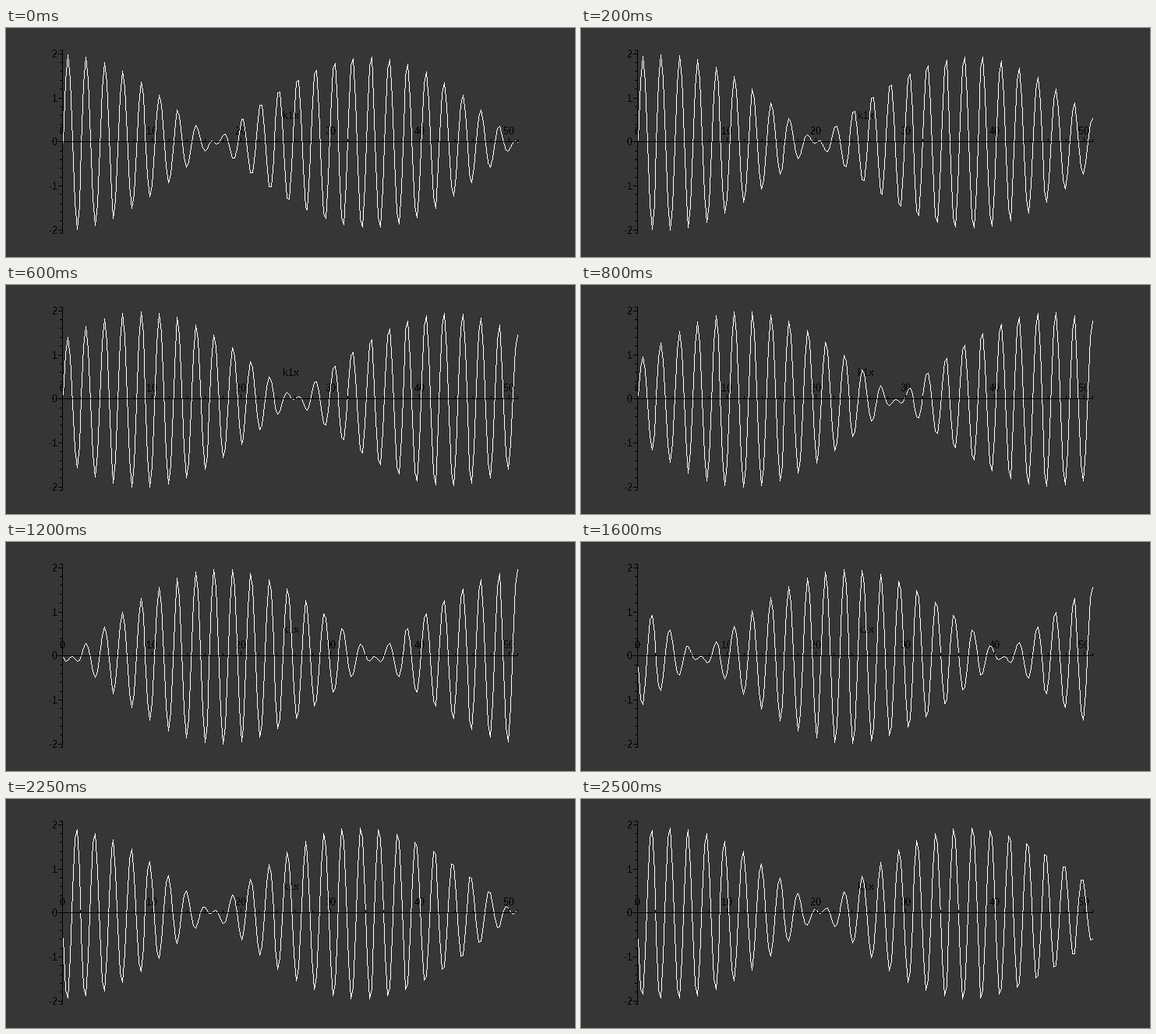
Animation of 730 by 295 pixels, one loop 2550 ms. Source, as a matplotlib script:

```python
import numpy as np
import matplotlib.pyplot as plt
from matplotlib.animation import FuncAnimation

W, H, DPI = 730, 295, 100
FRAMES, STEP_MS = 51, 50
PX = 72 / DPI                     # one pixel in points
AXIS_X, AXIS_Y = 72, 146          # pixel column and row of the axes
TOP, BOTTOM, RIGHT = 28, 264, 656
X_MAX = 51
Y_UNIT = 56.75

plt.rcParams["text.antialiased"] = False
plt.rcParams["text.hinting"] = "native"
plt.rcParams["text.hinting_factor"] = 1
plt.rcParams["font.family"] = "Liberation Sans"

fig = plt.figure(figsize=(W / DPI, H / DPI), dpi=DPI, facecolor="#363636")
ax = fig.add_axes([0, 0, 1, 1])


def stroke(x0, y0, x1, y1):
    """Black one-pixel line between two pixels, both included."""
    ax.plot([x0 + 0.5, x1 + 0.5], [y0 + 0.5, y1 + 0.5], color="black",
            lw=0.6 * PX, antialiased=False, snap=False, zorder=3,
            solid_capstyle="projecting")


def label(x, y, text, align):
    ax.text(x, y, text, color="black", fontsize=13 * PX, ha=align,
            va="baseline", zorder=1)


def draw_axes():
    stroke(AXIS_X, TOP, AXIS_X, BOTTOM)
    stroke(AXIS_X, AXIS_Y, RIGHT, AXIS_Y)

    for x in range(0, X_MAX, 2):
        col = round(AXIS_X + x * (RIGHT - AXIS_X) / X_MAX)
        size = 5 if x % 10 == 0 else 3
        stroke(col, AXIS_Y - size, col, AXIS_Y)
        if x % 10 == 0:
            label(col + 0.5, 137, str(x), "center")
    stroke(RIGHT, AXIS_Y - 3, RIGHT, AXIS_Y)

    for i in range(-10, 11):
        row = int(AXIS_Y + 0.75 - i / 5 * Y_UNIT)
        size = 5 if i % 5 == 0 else 3
        stroke(AXIS_X - size, row, AXIS_X, row)
        if i % 5 == 0:
            label(66, row + 5, str(i // 5), "right")
    for row in (TOP, BOTTOM):
        stroke(AXIS_X - 3, row, AXIS_X, row)

    label(365.5, 117, "k1x", "center")


def trace(cols, rows):
    """Whole pixels along a polyline, one per step of the longer side."""
    mask = np.zeros((H, W, 4))
    for c0, r0, c1, r1 in zip(cols, rows, cols[1:], rows[1:]):
        steps = max(abs(c1 - c0), abs(r1 - r0)) + 1
        c = np.rint(np.linspace(c0, c1, steps)).astype(int)
        r = np.rint(np.linspace(r0, r1, steps)).astype(int)
        mask[r, c] = 1
    return mask


# Two opposite waves of nearly equal length; the coarse sampling is visible.
x = np.linspace(0, X_MAX, 200)
cols = np.rint(np.linspace(AXIS_X + 1, RIGHT, len(x))).astype(int)


def wave(n):
    t = np.pi * n / (FRAMES - 1)
    y = np.sin(np.pi * x - t) + np.sin(16 / 17 * np.pi * x + 1.2 * t)
    return trace(cols, np.rint(AXIS_Y + 1 - y * Y_UNIT).astype(int))


curve = ax.imshow(wave(0), extent=(0, W, H, 0), aspect="auto",
                  interpolation="nearest", zorder=2)
draw_axes()
ax.set_xlim(0, W)
ax.set_ylim(H, 0)
ax.axis("off")


def update(n):
    curve.set_data(wave(n))
    return curve,


anim = FuncAnimation(fig, update, frames=FRAMES, interval=STEP_MS,
                     repeat=True, repeat_delay=0)
plt.show()
```
